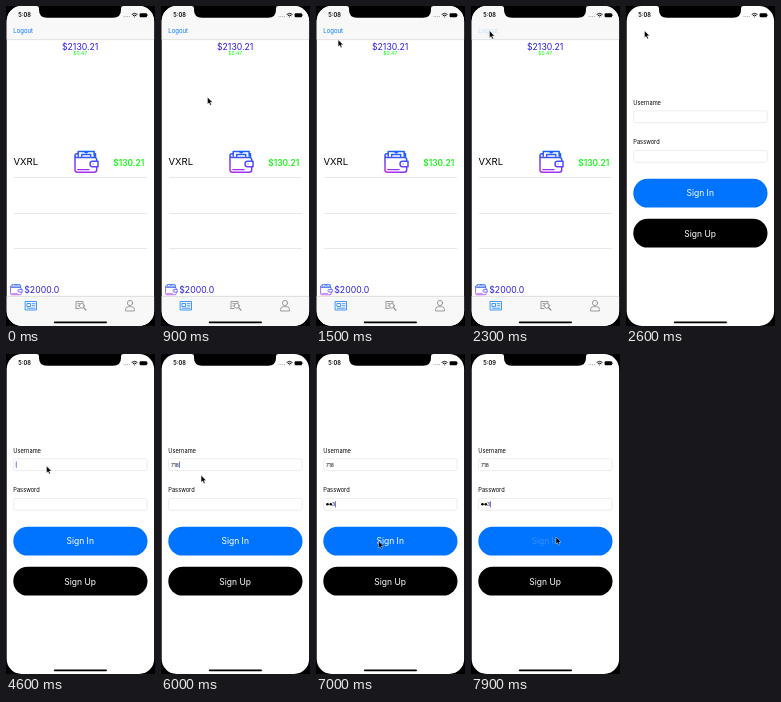
An HTML page that plays this animation: 149 px wide and 320 px high, repeating every 8000 ms.

```html
<!DOCTYPE html>
<html lang="en">
<head>
<meta charset="utf-8">
<title>Portfolio logout and sign in</title>
<style>
html, body { margin: 0; width: 100%; height: 100%; overflow: hidden; background: #000; }
svg { display: block; width: 149px; height: 320px; font-family: Inter, Roboto, sans-serif; }
.line { fill: none; stroke-linecap: round; stroke-linejoin: round; }
.mid { text-anchor: middle; }
</style>
</head>
<body>
<svg viewBox="0 0 149 320">
  <defs>
    <clipPath id="glass"><rect x="0.7" y="0" width="147.4" height="320" rx="15"/></clipPath>
    <linearGradient id="ink" gradientUnits="userSpaceOnUse" x1="15" y1="0" x2="9" y2="23">
      <stop offset="0.1" stop-color="#1763f5"/>
      <stop offset="0.55" stop-color="#5a45f5"/>
      <stop offset="1" stop-color="#b42cf0"/>
    </linearGradient>
    <g id="wallet" class="line" stroke="url(#ink)" stroke-width="1.5">
      <path d="M4 6V1.2H20V6M7.5 6V4.2H16.5V6M10 1.2Q12 4 14 1.2"/>
      <path d="M3.8 3.6H2.5Q0.8 3.6 0.8 5.6V19.5Q0.8 22 3.3 22H20Q22.5 22 22.5 19.5V16.6M0.8 5.6Q0.8 7.2 2.8 7.2H20Q22.5 7.2 22.5 9.4V11M20 3.6H21.3V7.2"/>
      <path d="M23.8 11H18.2Q15.8 11 15.8 13.8T18.2 16.6H23.8Z"/>
      <path d="M18.8 13.8H19M3.5 19.4H15" stroke-width="1.1"/>
    </g>
  </defs>

  <rect width="149" height="320"/>
  <g clip-path="url(#glass)">
    <rect width="149" height="320" fill="#fff"/>

    <g id="home">
      <rect width="149" height="33.5" fill="#f8f8f8"/>
      <path d="M0 33.6H149" stroke="#c9c9c9" stroke-width="0.5"/>
      <text id="logout" x="7.3" y="27.4" font-size="6" fill="#007aff">Logout</text>
      <g fill="#2a1be0">
        <text class="mid" x="74.2" y="43.8" font-size="8.7">$2130.21</text>
        <text x="18.3" y="286.8" font-size="8.7">$2000.0</text>
      </g>
      <text class="mid" x="74.2" y="49.4" font-size="5" fill="#0f0">$0.47</text>
      <text x="7.5" y="158.6" font-size="9.5">VXRL</text>
      <text x="138.3" y="159.6" font-size="8.4" font-weight="600" fill="#1df51d" text-anchor="end">$130.21</text>
      <use href="#wallet" transform="translate(68.2 144.2)"/>
      <use href="#wallet" transform="translate(4.2 278) scale(.49)"/>
      <path d="M8 171.5H141M8 207.5H141M8 242.5H141" stroke="#dedede" stroke-width="0.7"/>
      <rect y="290" width="149" height="30" fill="#f8f8f8"/>
      <path d="M0 290.3H149" stroke="#bdbdbd" stroke-width="0.5"/>
      <g class="line" stroke="#1680ff" stroke-width="0.8">
        <path d="M19.5 295.5H30.5V304H19.5ZM21.3 297.5H24.5V300.5H21.3ZM26.2 297.7H29M26.2 299.8H29M21.3 302.2H29"/>
      </g>
      <g class="line" stroke="#858585" stroke-width="0.8">
        <path d="M70 302.5V295.5H77V297M70 302.5H73M71.8 297.6H73.5M71.8 299.8H72.6"/>
        <circle cx="75.8" cy="299.8" r="2.4"/>
        <path d="M77.6 301.6L80 304.2" stroke-width="1.1"/>
        <circle cx="124" cy="297" r="2.6"/>
        <path d="M119.6 304.6V303.4Q119.6 300.7 122.4 300.7H125.6Q128.4 300.7 128.4 303.4V304.6Z"/>
      </g>
    </g>

    <g id="login">
      <g font-size="5.7">
        <text x="7.3" y="98.5">Username</text>
        <text x="7.3" y="138">Password</text>
      </g>
      <g fill="#fff" stroke="#dfdfdf" stroke-width="0.6">
        <rect x="7.6" y="104.8" width="133.6" height="11.8" rx="2"/>
        <rect x="7.6" y="144.4" width="133.6" height="11.8" rx="2"/>
      </g>
      <text id="user" x="10" y="112.5" font-size="5"></text>
      <g id="dots"><circle cx="11.5" cy="150.3" r="1.3"/><circle cx="14.8" cy="150.3" r="1.3"/></g>
      <text id="last" y="152.2" font-size="5"></text>
      <rect id="caret" width="0.8" height="6.4" fill="#3f5cf0"/>
      <rect x="7.3" y="172.8" width="134.2" height="28.8" rx="14.4" fill="#0073ff"/>
      <rect x="7.3" y="212.8" width="134.2" height="28.8" rx="14.4"/>
      <g class="mid" font-size="8.5" fill="#fff">
        <text id="signIn" x="74.2" y="190.4">Sign In</text>
        <text x="74.2" y="230.6">Sign Up</text>
      </g>
    </g>

    <text id="clock" x="12.2" y="11.2" font-size="5.7" font-weight="600"></text>
    <path d="M117.6 10.6H124" stroke="#999" stroke-width="0.9" stroke-dasharray="0.9 0.9"/>
    <g class="line" stroke="#000" stroke-width="0.9">
      <path d="M126 8.2Q128.6 6.2 131.2 8.2M127.1 9.6Q128.6 8.5 130.1 9.6M128.6 10.9V11"/>
    </g>
    <rect x="133.6" y="7.2" width="7.4" height="4" rx="1"/>
    <path d="M141.6 8.5V9.9" stroke="#000" stroke-width="0.6"/>
    <path d="M30.5 0Q33 0 33 2.3V4Q33 11.8 41 11.8H107Q115 11.8 115 4V2.3Q115 0 117.5 0Z"/>
    <rect x="47.8" y="315.4" width="53.2" height="1.9" rx="0.95"/>
  </g>

  <path id="pointer" d="M0 0V7L1.6 5.6L2.7 8.1L3.9 7.6L2.8 5.1H5Z" stroke="#fff" stroke-width="0.4"/>
</svg>
<script>
const LOOP = 8000, STEP = 100;
const el = Object.fromEntries([...document.querySelectorAll("[id]")].map(n => [n.id, n]));

// Pointer stops: time, x, y
const path = [
  [100, 141, 272], [200, 118, 190], [300, 85, 112], [400, 58, 71], [500, 47.5, 93.5],
  [800, 47.5, 93.5], [1700, 18.5, 25], [2600, 18.5, 24.7], [3300, 40.5, 112],
  [5900, 40.5, 112], [6200, 39, 148], [6900, 39, 148], [7000, 62.5, 187],
  [7400, 89, 209], [7500, 89, 209], [7900, 85, 183]
];
const smooth = k => k * k * (3 - 2 * k);

function pointerAt(t) {
  const i = path.findIndex(p => p[0] > t);
  if (i < 0) return path[path.length - 1].slice(1);
  const [t0, x0, y0] = path[i - 1], [t1, x1, y1] = path[i];
  const k = smooth((t - t0) / (t1 - t0));
  return [x0 + (x1 - x0) * k, y0 + (y1 - y0) * k];
}

const show = (node, on) => node.setAttribute("visibility", on ? "inherit" : "hidden");
const typed = (t, times) => times.filter(s => t >= s).length;

// Solid for half a second, then a short fade out and in
function blink(age) {
  const p = age % 1000;
  return p < 500 ? 1 : p < 600 || p >= 900 ? 0.5 : 0;
}

const userKeys = [5400, 5600, 5800], passKeys = [6400, 6600, 6800];
const focusUser = 3600, focusPass = 6300;
const userStops = [9.8, 12.7, 15, 18.2], passStops = [9.8, 12.8, 16, 19];

function draw(t) {
  const onLogin = t >= 2600;
  show(el.home, !onLogin);
  show(el.login, onLogin);
  el.logout.setAttribute("opacity", t >= 1800 ? 0.2 : 1);
  el.signIn.setAttribute("opacity", t >= 7800 ? 0.2 : 1);
  el.clock.textContent = t >= 7600 ? "5:09" : "5:08";

  const u = typed(t, userKeys), p = typed(t, passKeys);
  el.user.textContent = "718".slice(0, u);
  [...el.dots.children].forEach((dot, i) => show(dot, onLogin && p > i + 1));
  el.last.textContent = p ? "713"[p - 1] : "";
  el.last.setAttribute("x", 9.8 + Math.max(0, p - 1) * 3.15);

  const inPass = t >= focusPass;
  const start = Math.max(...[focusUser, focusPass, ...userKeys, ...passKeys].filter(s => s <= t), 0);
  el.caret.setAttribute("x", inPass ? passStops[p] : userStops[u]);
  el.caret.setAttribute("y", inPass ? 147.1 : 107.4);
  el.caret.setAttribute("opacity", t >= focusUser ? blink(t - start) : 0);

  show(el.pointer, t >= 100);
  if (t >= 100) el.pointer.setAttribute("transform", `translate(${pointerAt(t)})`);
}

function tick() {
  draw(Math.floor(performance.now() % LOOP / STEP) * STEP);
  requestAnimationFrame(tick);
}
tick();
</script>
</body>
</html>
```
